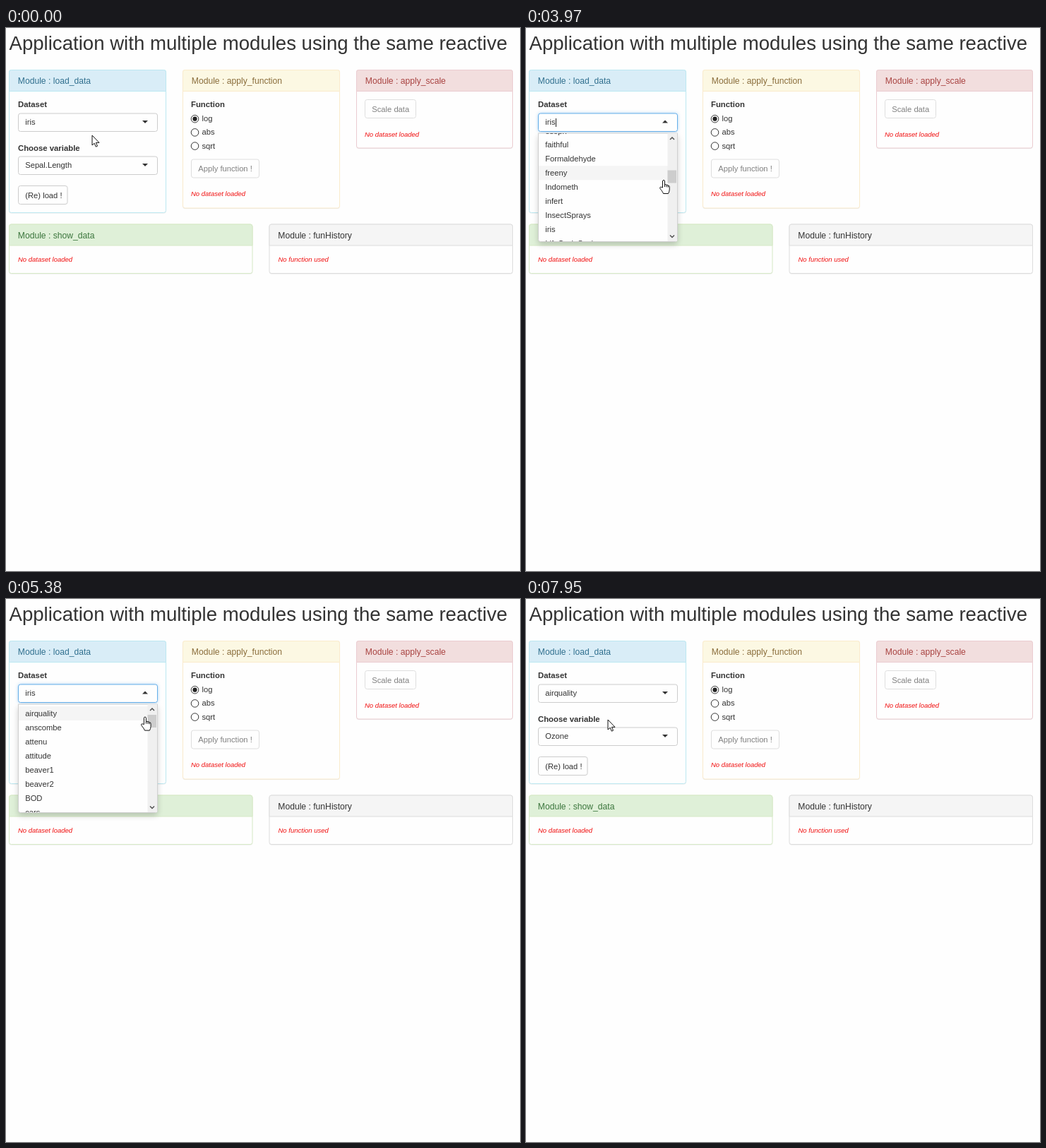
Recreate the animation shown at these times as an HTML page with a canvas. Size 728x769 px, loop 8 s.

```html
<!DOCTYPE html>
<html lang="en">
<head>
<meta charset="utf-8">
<title>Reactive modules</title>
<style>
html, body { margin: 0; width: 100%; height: 100%; overflow: hidden; background: #fefefe; }
canvas { display: block; width: 728px; height: 769px; }
</style>
</head>
<body>
<canvas id="stage" width="728" height="769"></canvas>
<script>
const ctx = document.getElementById('stage').getContext('2d');
const LOOP = 8000;
const OPEN = 2420, PRESS = 4520, RELEASE = 5220, PICK = 7180, CLOSE = 7250, LOADED = 7330;
const ROW = 19.93, LIST_TOP = 152, SCROLL = 255.6, THUMB = 37.5, GRAB_Y = 209.4;
const IRIS = 19, FREENY = 15;
const ITEMS = ('airquality anscombe attenu attitude beaver1 beaver2 BOD cars ChickWeight chickwts CO2 ' +
  'DNase esoph faithful Formaldehyde freeny Indometh infert InsectSprays iris LifeCycleSavings').split(' ');

// Pointer moves: first step, last step, number of steps, destination
const START = [122, 152];
const MOVES = [
  [840, 1630, 11, 98, 136.5],
  [2880, 2880, 1, 97, 142],
  [2950, 3680, 10, 153, 216],
  [3740, 3970, 4, 195, 215],
  [4060, 4290, 4, 205, GRAB_Y],
  [4520, 4910, 6, 205, 195],
  [4980, 5140, 3, 205, 170],
  [5220, 5300, 2, 202, 167],
  [5380, 6170, 11, 146, 163],
  [6240, 6320, 2, 140, 162],
  [7700, 7950, 4, 116, 171]
];

function pointerAt(t) {
  let [x, y] = START;
  for (const [from, to, n, tx, ty] of MOVES) {
    if (t < from) break;
    const k = t >= to ? n : Math.floor((t - from) / (to - from) * (n - 1) + 1e-6) + 1;
    x += (tx - x) * k / n;
    y += (ty - y) * k / n;
  }
  return { x, y };
}

function text(s, x, y, size = 11.2, color = '#333', style = '') {
  ctx.font = `${style} ${size}px "Liberation Sans", Arial, sans-serif`;
  ctx.fillStyle = color;
  ctx.fillText(s, x, y);
}

function box(x, y, w, h, fill, stroke, r = 3) {
  ctx.beginPath();
  ctx.roundRect(x, y, w, h, r);
  ctx.fillStyle = fill;
  ctx.fill();
  if (stroke) {
    ctx.shadowColor = 'transparent';
    ctx.strokeStyle = stroke;
    ctx.lineWidth = 1;
    ctx.stroke();
  }
}

function shadow(color, blur, dy = 0) {
  ctx.shadowColor = color;
  ctx.shadowBlur = blur;
  ctx.shadowOffsetY = dy;
}

function polygon(points, fill) {
  ctx.beginPath();
  points.forEach(([x, y]) => ctx.lineTo(x, y));
  ctx.closePath();
  ctx.fillStyle = fill;
  ctx.fill();
}

function disc(x, y, r, fill) {
  ctx.beginPath();
  ctx.arc(x, y, r, 0, 7);
  ctx.fillStyle = fill;
  ctx.fill();
}

function panel(x, y, w, h, title, head, border, color) {
  ctx.save();
  shadow('rgba(0,0,0,.09)', 1, 1);
  box(x, y, w, h, '#fefefe', border);
  ctx.restore();
  box(x, y, w, 30, head, border, [3, 3, 0, 0]);
  text('Module : ' + title, x + 12.3, y + 19.5, 12.15, color);
}

const warn = (s, x, y) => text(s, x, y, 9.5, '#f00f0f', 'italic');
const label = (s, x, y) => text(s, x, y, 11.35, '#333', 'bold');

function button(s, x, y, w, active) {
  box(x, y, w, 26, '#fefefe', active ? '#ccc' : '#dedede');
  text(s, x + 9.8, y + 17, 11.2, active ? '#333' : '#808080');
}

function select(s, y, open) {
  ctx.save();
  if (open) shadow('rgba(102,175,233,.6)', 5);
  box(17.5, y, 197, 25.5, '#fefefe', open ? '#66afe9' : '#ccc');
  ctx.restore();
  text(s, 27.2, y + 16);
  const base = y + (open ? 13.5 : 10), tip = base + (open ? -4 : 4);
  polygon([[193, base], [201, base], [197, tip]], '#333');
}

function radio(s, y, on) {
  ctx.beginPath();
  ctx.arc(267.5, y, 5.3, 0, 7);
  ctx.strokeStyle = '#333';
  ctx.lineWidth = 1;
  ctx.stroke();
  if (on) disc(267.5, y, 3.1, '#222');
  text(s, 277.5, y + 3.4);
}

function chevron(y, dir) {
  ctx.beginPath();
  ctx.moveTo(204, y + 1.5 * dir);
  ctx.lineTo(207, y - 1.5 * dir);
  ctx.lineTo(210, y + 1.5 * dir);
  ctx.strokeStyle = '#505050';
  ctx.lineWidth = 1.5;
  ctx.stroke();
}

function dropdown(offset, active) {
  const scroll = offset / THUMB * SCROLL;
  ctx.save();
  shadow('rgba(0,0,0,.2)', 8, 4);
  box(17.5, 149, 197, 153.5, '#fefefe', '#d0d0d0', [0, 0, 3, 3]);
  ctx.restore();

  ctx.save();
  ctx.beginPath();
  ctx.rect(18, 149, 196, 153);
  ctx.clip();
  ITEMS.forEach((name, i) => {
    const top = LIST_TOP + i * ROW - scroll;
    if (i === active) {
      ctx.fillStyle = '#f5f5f5';
      ctx.fillRect(18, top, 183, ROW);
    }
    text(name, 27.2, top + 14);
  });
  ctx.fillStyle = '#f0f0f0';
  ctx.fillRect(200.5, 149, 13.5, 153);
  ctx.fillStyle = '#cdcdcd';
  ctx.fillRect(200.5, 164 + offset, 12.5, 18);
  ctx.restore();
  chevron(156.5, 1);
  chevron(295, -1);
}

const ARROW = new Path2D('M0 0V14L3.2 11.2 5.3 16.2 7.5 15.2 5.4 10.4H10Z');
const HAND = new Path2D('M-1.5 11V2Q-1.5.5 0 .5T1.5 2V7Q4-.0 4 7.3Q6 6.6 6.2 8.2Q8.2 7.8 8.2 10V14' +
  'Q8 17 6.5 19.5H-.5Q-1 17.5-3.5 14.5L-5.4 11.8Q-5.2 9.6-3.3 10.3Z'.replace('4-.0', '4 6'));
const HAND_SAFE = new Path2D('M-1.5 11V2Q-1.5 .5 0 .5T1.5 2V7Q4 6 4 7.3Q6 6.6 6.2 8.2Q8.2 7.8 8.2 10V14' +
  'Q8 17 6.5 19.5H-.5Q-1 17.5 -3.5 14.5L-5.4 11.8Q-5.2 9.6 -3.3 10.3Z');
const FINGERS = new Path2D('M1.5 7V10M4 7.3V10.3M6.2 8.2V10.6');
const BEAM = new Path2D('M-3 -6H-1L0 -5 1 -6H3M0 -5V5M-3 6H-1L0 5 1 6H3');

function drawPointer(kind, x, y) {
  ctx.save();
  ctx.translate(x, y);
  ctx.strokeStyle = '#111';
  ctx.fillStyle = '#fff';
  ctx.lineWidth = 1;
  ctx.lineJoin = 'round';
  if (kind === 'beam') {
    ctx.lineWidth = 1.2;
    ctx.stroke(BEAM);
  } else {
    const shape = kind === 'hand' ? HAND_SAFE : ARROW;
    ctx.fill(shape);
    ctx.stroke(shape);
    if (kind === 'hand') ctx.stroke(FINGERS);
  }
  ctx.restore();
}

function pointerKind(t, x, y, open) {
  if (!open) return t < OPEN && y < 147 ? 'hand' : 'arrow';
  if (y < 147) return t < 2560 ? 'hand' : 'beam';
  return x > 201 ? 'arrow' : 'hand';
}

function page(t, open) {
  ctx.fillStyle = '#fefefe';
  ctx.fillRect(0, 0, 728, 769);
  text('Application with multiple modules using the same reactive', 4.5, 31, 27.6);

  panel(4.5, 59.5, 222, 202, 'load_data', '#d9edf7', '#bce8f1', '#31708f');
  panel(250.5, 59.5, 222, 195.5, 'apply_function', '#fcf8e3', '#faebcc', '#8a6d3b');
  panel(496.5, 59.5, 221, 110.5, 'apply_scale', '#f2dede', '#ebccd1', '#a94442');
  panel(4.5, 278, 344.5, 69.5, 'show_data', '#dff0d8', '#d6e9c6', '#3c763d');
  panel(373, 278, 344.5, 69.5, 'funHistory', '#f5f5f5', '#ddd', '#333');

  label('Dataset', 17, 112);
  select(t < CLOSE ? 'iris' : 'airquality', 121, open);
  label('Choose variable', 17, 174);
  select(t < LOADED ? 'Sepal.Length' : 'Ozone', 182, false);
  button('(Re) load !', 17.5, 223.5, 69.5, true);

  label('Function', 262, 112);
  ['log', 'abs', 'sqrt'].forEach((s, i) => radio(s, 128.7 + i * 19.2, i === 0));
  button('Apply function !', 262.5, 186, 96, false);
  button('Scale data', 508.5, 101.5, 72, false);

  warn('No dataset loaded', 262, 238.3);
  warn('No dataset loaded', 508, 154.3);
  warn('No dataset loaded', 17, 330.8);
  warn('No function used', 385.5, 330.8);
}

function draw(t) {
  const { x, y } = pointerAt(t);
  const open = t >= OPEN && t < CLOSE;
  const kind = pointerKind(t, x, y, open);
  page(t, open);

  if (open) {
    let offset = THUMB;
    if (t >= PRESS) offset = t < RELEASE ? Math.max(0, THUMB - GRAB_Y + y) : 0;
    let active = t < 3700 ? IRIS : FREENY;
    if (kind === 'hand' && y > 148) {
      active = Math.max(0, Math.floor((y + offset / THUMB * SCROLL - LIST_TOP) / ROW));
    }
    dropdown(offset, active);
    if (Math.floor((t - 2480) / 530) % 2 === 0) {
      ctx.fillStyle = '#222';
      ctx.fillRect(42, 128, 1, 12);
    }
  }

  const pressed = (t >= OPEN && t < 2560) || (t >= PRESS && t < RELEASE) || (t >= PICK && t < LOADED);
  if (pressed) disc(x, y, 10, 'rgba(240,228,40,.8)');
  drawPointer(kind, x, y);

  if (t >= 7560 && t < 7700) {
    ctx.beginPath();
    ctx.arc(150.5, 162, 5.3, 0, 7);
    ctx.strokeStyle = '#3a9bd5';
    ctx.lineWidth = 3;
    ctx.stroke();
  }
}

const begin = performance.now();
function tick() {
  draw((performance.now() - begin) % LOOP);
  requestAnimationFrame(tick);
}
tick();
</script>
</body>
</html>
```
